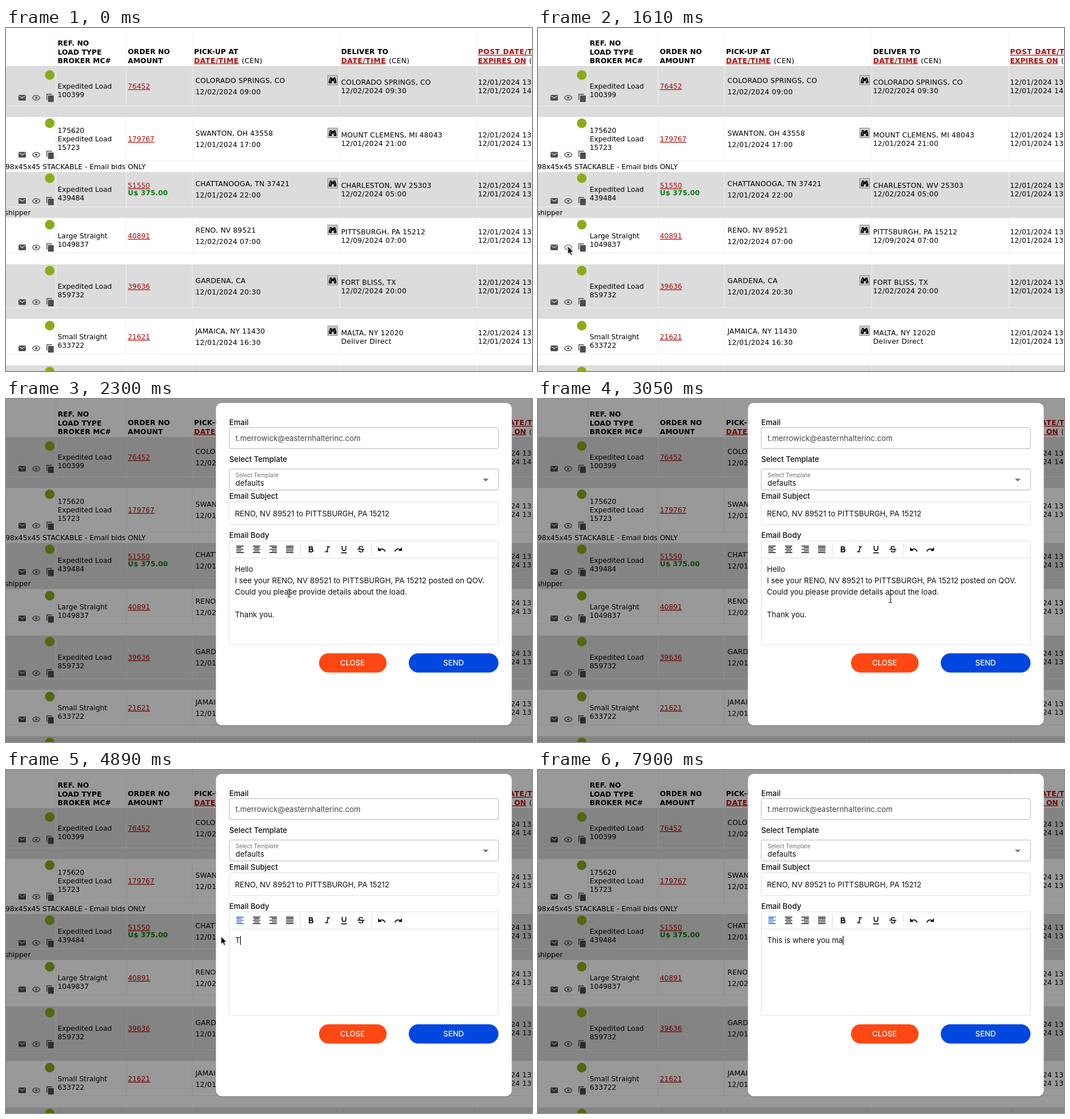
An HTML page that plays this animation: 926 px wide and 605 px high, repeating every 8000 ms.

```html
<!DOCTYPE html>
<html lang="en">
<head>
<meta charset="utf-8">
<title>Load board email</title>
<style>
  html, body { margin: 0; width: 100%; height: 100%; overflow: hidden; background: #fff; }
  svg { display: block; width: 926px; height: 605px; }
  text { white-space: pre; }

  .cell, .num, .head { font: 12.3px "DejaVu Sans", Verdana, sans-serif; fill: #000; }
  .cell { letter-spacing: .2px; }
  .date { letter-spacing: .3px; }
  .head { font-weight: 700; letter-spacing: .15px; }
  .link { fill: #ac0a0a; text-decoration: underline; }
  .slash { letter-spacing: .6px; }
  .price { fill: #127a12; font-weight: 700; }
  .icon { fill: #4c4c4c; stroke: #4c4c4c; }

  .ui { font: 13.3px Inter, "Open Sans", sans-serif; fill: #111; }
  .label, .btn { font-weight: 500; }
  .email { fill: #444; }
  .hint { font-size: 10px; fill: #707070; }
  .btn { fill: #fff; text-anchor: middle; }
  .tool { fill: none; stroke: #111; stroke-width: 1.7; }

  #modal, #eye, #close, #align, #message, #marks, #pointer, #arrow, #beam {
    animation: 8s step-end infinite;
  }
  #modal { animation-name: modal; }
  #eye { animation-name: eye; }
  #close { animation-name: close; animation-timing-function: linear; }
  #align { animation-name: align; }
  #message { animation-name: message; }
  #marks { animation-name: marks; }
  #pointer { animation-name: pointer; animation-timing-function: ease-in-out; }
  #arrow { animation-name: arrow; }
  #beam { animation-name: beam; }

  @keyframes modal { 0% { opacity: 0 } 20.8%, 100% { opacity: 1 } }
  @keyframes eye {
    0%, 20.8%, 100% { stroke: #4c4c4c; fill: #4c4c4c }
    18% { stroke: #3a9a48; fill: #3a9a48 }
  }
  @keyframes close { 0%, 20.9% { fill: #ff7148 } 24%, 100% { fill: #ff4713 } }
  @keyframes align { 0% { stroke: #111 } 46%, 100% { stroke: #1f5fc4 } }
  @keyframes message { 0% { opacity: 1 } 56.2%, 100% { opacity: 0 } }
  @keyframes marks {
    0% { clip-path: inset(100% 0 0 0) }
    46.5% { clip-path: inset(100% 0 0 0); animation-timing-function: steps(5) }
    52%, 100% { clip-path: inset(0) }
  }
  @keyframes pointer {
    0%, 5% { transform: translate(230px, 625px) }
    16% { transform: translate(68px, 398px) }
    18.5%, 22.6% { transform: translate(52.5px, 385px) }
    31% { transform: translate(575px, 335px) }
    37%, 43% { transform: translate(620.5px, 352px) }
    46%, 46.5% { transform: translate(474px, 382px) }
    52%, 100% { transform: translate(378.5px, 293.5px) }
  }
  @keyframes arrow { 0%, 51.2% { opacity: 1 } 27.5%, 62.6%, 100% { opacity: 0 } }
  @keyframes beam { 0%, 51.2%, 100% { opacity: 0 } 27.5% { opacity: 1 } }
</style>
</head>
<body>
<svg viewBox="0 0 926 605">
  <g id="table"></g>

  <g id="modal">
    <rect width="926" height="605" fill-opacity=".4"/>
    <rect x="369" y="8" width="522" height="569" rx="10" fill-opacity=".18"/>
    <rect x="369.5" y="7" width="521" height="568.500" rx="10" fill="#fff"/>
    <g fill="#fff" stroke="#b6b6b6">
      <rect x="393" y="50.5" width="474" height="37" rx="3"/>
      <rect x="393" y="123.500" width="474" height="37" rx="3"/>
      <g stroke="#dedede">
        <rect x="393" y="181.500" width="474" height="40" rx="4"/>
        <rect x="393" y="250" width="474" height="183" rx="3"/>
        <path d="M393 280.500h474M518.500 254v22M643.500 254v22"/>
      </g>
    </g>
    <path d="M839.500 140.500h10l-5 5z" fill="#757575"/>

    <text class="ui label" x="393" y="45.500">Email</text>
    <text class="ui label" x="393" y="111">Select Template</text>
    <text class="ui label" x="393" y="176.300">Email Subject</text>
    <text class="ui label" x="393" y="244.800">Email Body</text>
    <text class="ui hint" x="404" y="137.700">Select Template</text>
    <text class="ui" x="404" y="153">defaults</text>
    <text class="ui email" id="email" x="404" y="74"></text>
    <text class="ui" id="subject" x="403" y="207"></text>

    <g class="tool">
      <g id="aligns" stroke-width="1.400"></g>
      <path d="M534 260.700h3.200a2.100 2.100 0 0 1 0 4.200h-3.200zm0 4.200h3.800a2.300 2.300 0 0 1 0 4.600h-3.800z" stroke-width="2"/>
      <path d="M564.500 260.500h6M561.500 269.500h6M567.500 260.500l-3 9"/>
      <path d="M591.700 259v5a3.300 3.300 0 0 0 6.600 0v-5M590 271.300h10"/>
      <path d="M628 262c-.5-2.500-6.500-2.500-6.500.5 0 3 7 2 7 5 0 3-6.500 3-7.200 0M618.500 265h12.500" stroke-width="1.500"/>
      <g id="undo"><path d="M667.500 269c-2-5-7-6-10-2.500"/><path d="M655 261.500v6.500h6.500z" fill="#111" stroke="none"/></g>
      <use href="#undo" transform="matrix(-1 0 0 1 1352 0)"/>
    </g>

    <g id="message">
      <g id="marks" fill="#b4d5fe"></g>
      <g id="lines"></g>
    </g>
    <text class="ui" id="typed" x="403.500" y="305.300" xml:space="preserve"></text>
    <rect id="caret" y="292.500" width="1.200" height="16"/>

    <rect id="close" x="551" y="448.500" width="119" height="34" rx="17"/>
    <rect x="709" y="448.500" width="158" height="34" rx="17" fill="#0047e0"/>
    <text class="ui btn" x="610" y="470.300">CLOSE</text>
    <text class="ui btn" x="788" y="470.300">SEND</text>
  </g>

  <g id="pointer">
    <path id="arrow" d="M0 0v14l3.200-3 2.200 5 2.400-1-2.200-5h4.400z" stroke="#fff"/>
    <path id="beam" d="M-3-7q3 0 3 2q0-2 3-2M0-5v10M-3 7q3 0 3-2q0 2 3 2M-1.500 2h3" fill="none" stroke="#333" stroke-width="1.200"/>
  </g>
</svg>

<script>
const $ = id => document.getElementById(id);
const text = (x, y, str, cls, extra = '') =>
  `<text x="${x}" y="${y}" class="${cls}" ${extra}>${str}</text>`;
const rect = (x, y, w, h, fill) =>
  `<rect x="${x}" y="${y}" width="${w}" height="${h}" fill="${fill}"/>`;

// b is the middle baseline of a row; tall rows push their icons outwards
const rows = [
  { b: 107, top: 67, end: 137, type: ['Expedited Load', '100399'], order: '76452',
    from: ['COLORADO SPRINGS, CO', '12/02/2024 09:00'], to: ['COLORADO SPRINGS, CO', '12/02/2024 09:30'], ends: 14 },
  { b: 200, top: 157, end: 234, tall: 1, type: ['175620', 'Expedited Load', '15723'], order: '179767',
    from: ['SWANTON, OH 43558', '12/01/2024 17:00'], to: ['MOUNT CLEMENS, MI 48043', '12/01/2024 21:00'],
    note: ['98x45x45 STACKABLE - Email bids ONLY', 246] },
  { b: 289, top: 254, end: 315, type: ['Expedited Load', '439484'], order: '51550', price: 'U$ 375.00',
    from: ['CHATTANOOGA, TN 37421', '12/01/2024 22:00'], to: ['CHARLESTON, WV 25303', '12/02/2024 05:00'],
    note: ['shipper', 43.5] },
  { b: 371, top: 335, end: 396, type: ['Large Straight', '1049837'], order: '40891', hover: 1,
    from: ['RENO, NV 89521', '12/02/2024 07:00'], to: ['PITTSBURGH, PA 15212', '12/09/2024 07:00'] },
  { b: 460, top: 417, end: 493, tall: 1, type: ['Expedited Load', '859732'], order: '39636',
    from: ['GARDENA, CA', '12/01/2024 20:30'], to: ['FORT BLISS, TX', '12/02/2024 20:00'] },
  { b: 549, top: 513, end: 574, type: ['Small Straight', '633722'], order: '21621',
    from: ['JAMAICA, NY 11430', '12/01/2024 16:30'], to: ['MALTA, NY 12020', 'Deliver Direct'] }
];
const columns = [88, 212, 328, 587.5, 829];

const dividers = (top, end, color) =>
  columns.map(x => rect(x - .5, top, 1, end - top, color)).join('');
const badge = y => `<circle cx="77" cy="${y}" r="8.5" fill="#8bac18"/>`;

function icons(y, hover) {
  return `<g class="icon" transform="translate(0 ${y})">
    <rect x="22" y="-5" width="13" height="10" rx="1.5" stroke="none"/>
    <path d="M23.500-3l5 3.500 5-3.500" fill="none" stroke="#ddd" stroke-width="1.200"/>
    <g ${hover ? 'id="eye"' : ''}>
      <path d="M46.700 0c2.500-5.500 10.500-5.500 13 0c-2.500 5.500-10.500 5.500-13 0z" fill="none" stroke-width="1.400"/>
      <circle cx="53.200" r="2" stroke="none"/>
    </g>
    <rect x="74" y="-4" width="10" height="11.500" rx="1" stroke="none"/>
    <path d="M72 4v-10.300h9" fill="none" stroke-width="1.400"/>
  </g>`;
}

function binoculars(y) {
  return `<g transform="translate(575 ${y})">
    <rect x="-8.500" y="-8.500" width="17" height="17" fill="#cacaca" stroke="#8a8a8a"/>
    <path d="M-6.500 5.500v-4l2-6.500h2.500l1 2h2l1-2h2.500l2 6.500v4h-4.500v-4h-3.500v4z"/>
    <path d="M-4 3v-3l1-3M3 3v-3l1-1" fill="none" stroke="#ccc" stroke-width=".8"/>
  </g>`;
}

function drawRow(r, i) {
  const { b } = r, grey = i % 2 === 0;
  const next = rows[i + 1]?.top ?? 595;
  const line = grey ? '#f1f1f1' : '#ededed';
  const first = b - (r.type.length === 3 ? 15 : 0);
  return rect(0, r.top, 926, next - r.top, grey ? '#dcdcdc' : '#fff')
    + rect(0, r.end, 926, 1, line) + dividers(r.top, r.end, line)
    + badge(b - (r.tall ? 32 : 24)) + icons(b + (r.tall ? 23.5 : 16), r.hover)
    + binoculars(b - 15)
    + r.type.map((s, k) => text(91, first + k * 15.2, s, 'num')).join('')
    + text(214.5, r.price ? b - 7 : b, r.order, 'num link')
    + (r.price ? text(214.5, b + 6, r.price, 'num price') : '')
    + text(333.5, b - 10, r.from[0], 'cell') + text(333.5, b + 10, r.from[1], 'cell date')
    + text(590, b - 7.3, r.to[0], 'cell') + text(590, b + 8, r.to[1], 'cell date')
    + text(831, b - 7.3, '12/01/2024 13:10', 'cell date')
    + text(831, b + 8, `12/01/2024 ${r.ends || 13}:40`, 'cell date')
    + (r.note ? text(r.note[1], r.end + 14.5, r.note[0], 'num', 'text-anchor="end"') : '');
}

function drawHeader() {
  const when = x => text(x, 61.6, 'DATE/TIME', 'head link slash') + text(x + 84, 61.6, '(CEN)', 'cell');
  return dividers(0, 67, '#f0f0f0')
    + ['REF. NO', 'LOAD TYPE', 'BROKER MC#'].map((s, k) => text(91, 31.3 + k * 15.2, s, 'head')).join('')
    + text(214.5, 46.4, 'ORDER NO', 'head') + text(214.5, 61.6, 'AMOUNT', 'head')
    + text(331, 46.4, 'PICK-UP AT', 'head') + when(331)
    + text(590, 46.4, 'DELIVER TO', 'head') + when(590)
    + text(831, 46.4, 'POST DATE/TIME', 'head link slash')
    + text(831, 61.6, 'EXPIRES ON', 'head link') + text(921, 61.6, '(CEN)', 'cell');
}

$('table').innerHTML = drawHeader() + rows.map(drawRow).join('')
  + rect(0, 595, 926, 10, '#dcdcdc') + dividers(595, 605, '#f1f1f1') + badge(606);

// Alignment icons: even lines are long, odd ones short unless justified
$('aligns').innerHTML = [0, .5, 1, null].map((shift, i) => {
  let d = '';
  for (let k = 0; k < 5; k++) {
    const w = k % 2 && shift !== null ? 9 : 13;
    d += `M${405.5 + i * 29.2 + (13 - w) * (shift || 0)} ${259.5 + k * 2.8}h${w}`;
  }
  return `<path ${i ? '' : 'id="align"'} d="${d}"/>`;
}).join('');

const mails = [
  { email: 'bram.t@mqm-freight.com', route: 'GARDENA, CA to FORT BLISS, TX' },
  { email: 't.merrowick@easternhalterinc.com', route: 'RENO, NV 89521 to PITTSBURGH, PA 15212' }
];
let shown;
function showMail(mail) {
  if (mail === shown) return;
  shown = mail;
  $('email').textContent = mail.email;
  $('subject').textContent = mail.route;
  $('lines').innerHTML = ['Hello', `I see your ${mail.route} posted on QOV.`,
    'Could you please provide details about the load.', '', 'Thank you.']
    .map((s, k) => text(403, 305.3 + k * 20, s, 'ui')).join('');
}

showMail(mails[1]);
$('marks').innerHTML = [...$('lines').children].map((line, k) =>
  rect(403, 291 + k * 20, line.getComputedTextLength() || 4, 20, '#b4d5fe')).join('');

const phrase = 'This is where you ma';
const keyTimes = [4790, 5010, 5290, 5480, 5670, 5860, 5960, 6060, 6140, 6230,
  6320, 6400, 6550, 6680, 6810, 7030, 7180, 7350, 7500, 7780];
const CLEARED = 4496;

let start;
function tick(now) {
  start ??= now;
  const t = (now - start) % 8000;
  showMail(mails[t < 1810 ? 0 : 1]);
  $('typed').textContent = phrase.slice(0, keyTimes.filter(k => k <= t).length);
  $('caret').setAttribute('x', 403.5 + $('typed').getComputedTextLength());
  $('caret').setAttribute('opacity', t < CLEARED ? 0 : 1);
  requestAnimationFrame(tick);
}
requestAnimationFrame(tick);
</script>
</body>
</html>
```
